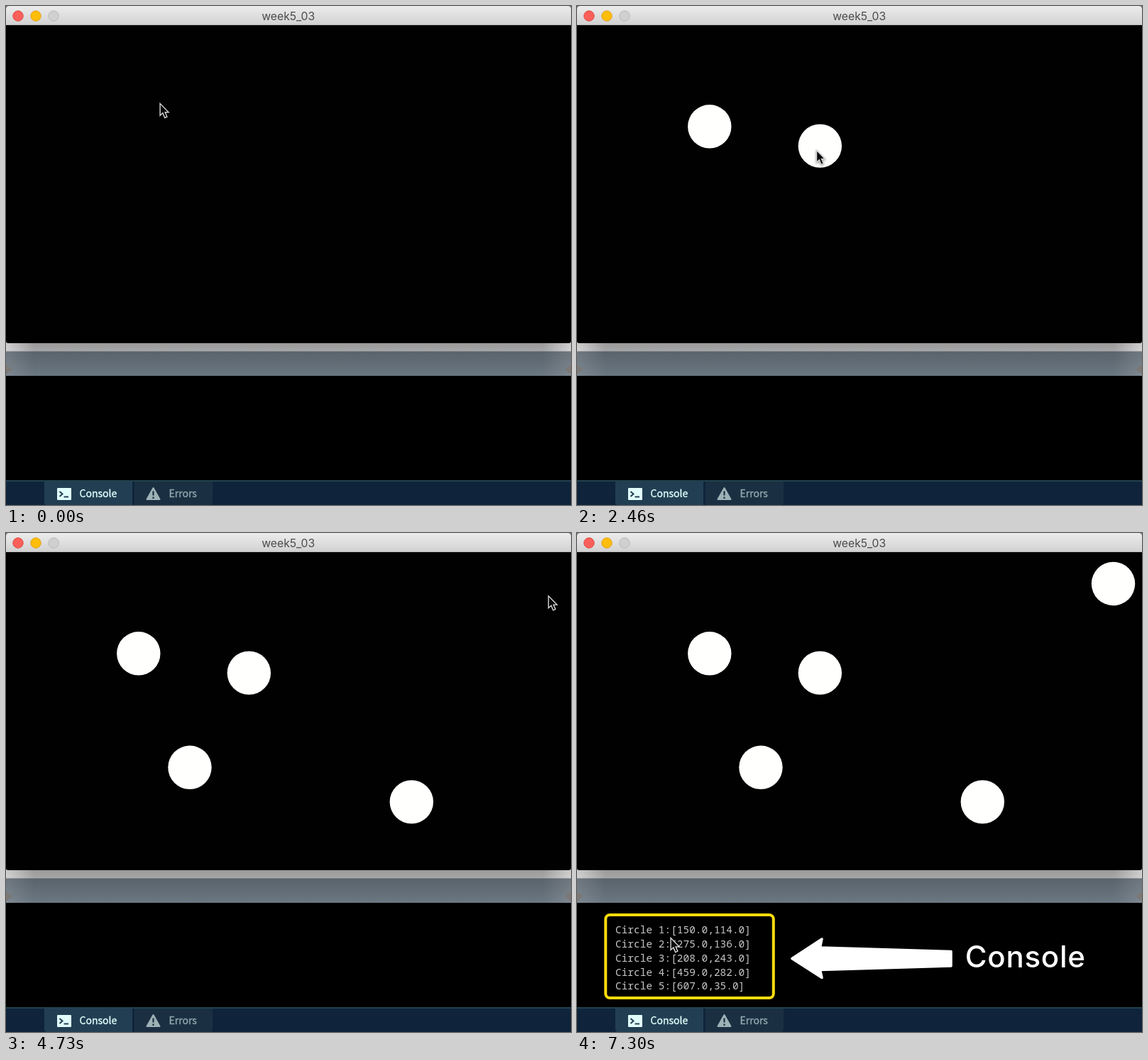
Animation of 796 by 703 pixels, one loop 8160 ms. Source, as an HTML page:

```html
<!DOCTYPE html>
<html lang="en">
<head>
<meta charset="utf-8">
<title>Circles and console</title>
<style>
  html, body { margin: 0; width: 100%; height: 100%; overflow: hidden; background: #000; }
  svg { display: block; width: 796px; height: 703px; }
  .ui { font: 14px "Noto Sans CJK JP", "Noto Sans CJK SC", "Noto Sans", sans-serif; stroke-width: .35; }
  .log { font: 14.47px "Noto Sans Mono", "DejaVu Sans Mono", monospace; fill: #c6c6c6; white-space: pre; }
  #cursor { filter: drop-shadow(0 1.5px 1.5px rgba(0, 0, 0, .45)); }
</style>
</head>
<body>
<svg viewBox="0 0 796 703">
  <defs>
    <linearGradient id="bar" x2="0" y2="1">
      <stop stop-color="#ececec"/><stop offset="1" stop-color="#d1d1d1"/>
    </linearGradient>
    <linearGradient id="strip" x2="0" y2="1">
      <stop stop-color="#949494"/><stop offset="1" stop-color="#a8a8a8"/>
    </linearGradient>
    <linearGradient id="slate" x2="0" y2="1">
      <stop stop-color="#59636b"/><stop offset="1" stop-color="#6b7782"/>
    </linearGradient>
    <linearGradient id="edges">
      <stop stop-color="#fff" stop-opacity=".5"/><stop offset=".05" stop-color="#fff" stop-opacity="0"/>
      <stop offset=".95" stop-color="#fff" stop-opacity="0"/><stop offset="1" stop-color="#fff" stop-opacity=".5"/>
    </linearGradient>
  </defs>

  <!-- backdrop behind the sketch window -->
  <rect y="470" width="796" height="17" fill="url(#strip)"/>
  <rect y="470" width="796" height="17" fill="url(#edges)"/>
  <rect y="486.5" width="796" height="34.5" fill="url(#slate)"/>
  <rect y="486.5" width="796" height="34.5" fill="url(#edges)" opacity=".25"/>
  <path d="M0 505L9 512L0 519ZM796 505L787 512L796 519Z" fill="#7b7875"/>

  <!-- sketch window -->
  <path d="M0 20H796V472Q796 475 793 475H3Q0 475 0 472Z" fill="#010102"/>
  <rect width="796" height="10" fill="#6d7a84"/>
  <path d="M0 27V5Q0 0 5 0H791Q796 0 796 5V27Z" fill="url(#bar)"/>
  <rect y="26" width="796" height="1" fill="#b8b8b8"/>
  <circle cx="17" cy="14" r="7.2" fill="#fc605a" stroke="#e0443e"/>
  <circle cx="42" cy="14" r="7.2" fill="#fdbd08" stroke="#e0a11a"/>
  <circle cx="67" cy="14" r="7.2" fill="#d0d0d0" stroke="#b9b9b9"/>
  <text x="397.7" y="20" text-anchor="middle" font-family="Inter, sans-serif" font-size="15.7" fill="#4b4b4b">week5_03</text>
  <g id="circles" fill="#fffffd"></g>

  <!-- console panel -->
  <rect y="521" width="796" height="147"/>
  <rect y="668" width="796" height="35" fill="#0f243b"/>
  <rect y="668" width="796" height="2" fill="#21424f"/>
  <path d="M54 670H178V703H58Q54 703 54 699Z" fill="#223e53"/>
  <path d="M181 670H291V699Q291 703 287 703H181Z" fill="#1a3042"/>
  <rect x="72" y="679" width="20" height="17" rx="1" fill="#e2fffc"/>
  <path d="M75.5 684L79.5 687.5L75.5 691M81.5 691.5H88" fill="none" stroke="#223e53" stroke-width="2"/>
  <path d="M207.5 679L216.5 695H198.5Z" fill="#9db2b6" stroke="#9db2b6" stroke-width="2" stroke-linejoin="round"/>
  <path d="M207.5 683.5V689.5M207.5 691.5V694" stroke="#1a3042" stroke-width="2.2"/>
  <text class="ui" x="103.5" y="692" fill="#e2fffc" stroke="#e2fffc">Console</text>
  <text class="ui" x="229.5" y="692" fill="#92a7ad" stroke="#92a7ad">Errors</text>
  <g id="log" class="log"></g>

  <g id="note">
    <rect x="40.3" y="538" width="236.5" height="117" rx="6" fill="none" stroke="#ffdc0c" stroke-width="4"/>
    <path d="M303 599.5L345 572L342.5 584L527 589.5V610L342.5 615.5L345 626.5Z" fill="#fff" stroke="#fff" stroke-width="3.5" stroke-linejoin="round"/>
    <text x="546.8" y="612" font-family="Inter, sans-serif" font-size="42" font-weight="500" letter-spacing=".75" fill="#fff">Console</text>
  </g>

  <path id="cursor" d="M1.2 1.5V18.4L5 14.9L7.8 21.6L11 20.2L8.3 13.8H13.2Z" fill="#0a0a0a" stroke="#d6d6d6" stroke-width="1.4"/>
</svg>
<script>
const LOOP = 8160, LOG_TIME = 5730, NOTE_TIME = 5960;
const SCALE = 1.2445; // sketch units to stage pixels

// x, y in sketch units; the cursor arrives during from..to along a path bowed by some pixels
const circles = [
  { x: 150, y: 114, from: 0, to: 360, click: 1030, bow: 20 },
  { x: 275, y: 136, from: 1570, to: 1800, click: 2130, bow: 0 },
  { x: 208, y: 243, from: 2430, to: 2730, click: 3000, bow: 0 },
  { x: 459, y: 282, from: 3270, to: 3630, click: 3900, bow: 0 },
  { x: 607, y: 35, from: 4100, to: 4900, click: 5530, bow: 28 }
];

const el = id => document.getElementById(id);
const clamp = u => Math.min(1, Math.max(0, u));
const settle = u => 1 - (1 - u) ** 3 * (1 + 3 * u);
const center = c => [c.x * SCALE + .1, c.y * SCALE + 27.9];

el("circles").innerHTML = circles.map(c => {
  const [x, y] = center(c);
  return `<circle cx="${x}" cy="${y}" r="30.7"/>`;
}).join("");
el("log").innerHTML = circles.map((c, i) =>
  `<text x="54" y="${564 + i * 19.85}">Circle ${i + 1}:[${c.x}.0,${c.y}.0]</text>`).join("");
const dots = [...el("circles").children];

// Inward spiral over the printed lines
function spiral(u) {
  const angle = 9.1 * u - .4, r = 1 - .8 * u ** 3;
  return [137 + 41 * r * Math.cos(angle), 564 + 38 * r * Math.sin(angle)];
}

const moves = circles.map(c => {
  const [x, y] = center(c);
  return { ...c, goal: [x - 1.4, y - 2.8] };
});
moves.push({ from: 5930, to: 6600, bow: 0, goal: spiral(0) });

function cursorAt(t) {
  if (t > 6600) return spiral(clamp((t - 6600) / 700));
  let [x, y] = [216, 136];
  for (const { from, to, bow, goal } of moves) {
    if (t < from) break;
    const u = clamp((t - from) / (to - from)), s = settle(u);
    const dx = goal[0] - x, dy = goal[1] - y;
    const side = bow * Math.sin(Math.PI * u) / Math.hypot(dx, dy);
    x += dx * s - dy * side;
    y += dy * s + dx * side;
  }
  return [x, y];
}

const show = (node, on) => node.setAttribute("visibility", on ? "visible" : "hidden");
const start = performance.now();

function draw() {
  const t = (performance.now() - start) % LOOP;
  dots.forEach((dot, i) => show(dot, t >= circles[i].click));
  show(el("log"), t >= LOG_TIME);
  show(el("note"), t >= NOTE_TIME);
  el("cursor").setAttribute("transform", `translate(${cursorAt(t)})`);
  requestAnimationFrame(draw);
}
draw();
</script>
</body>
</html>
```
